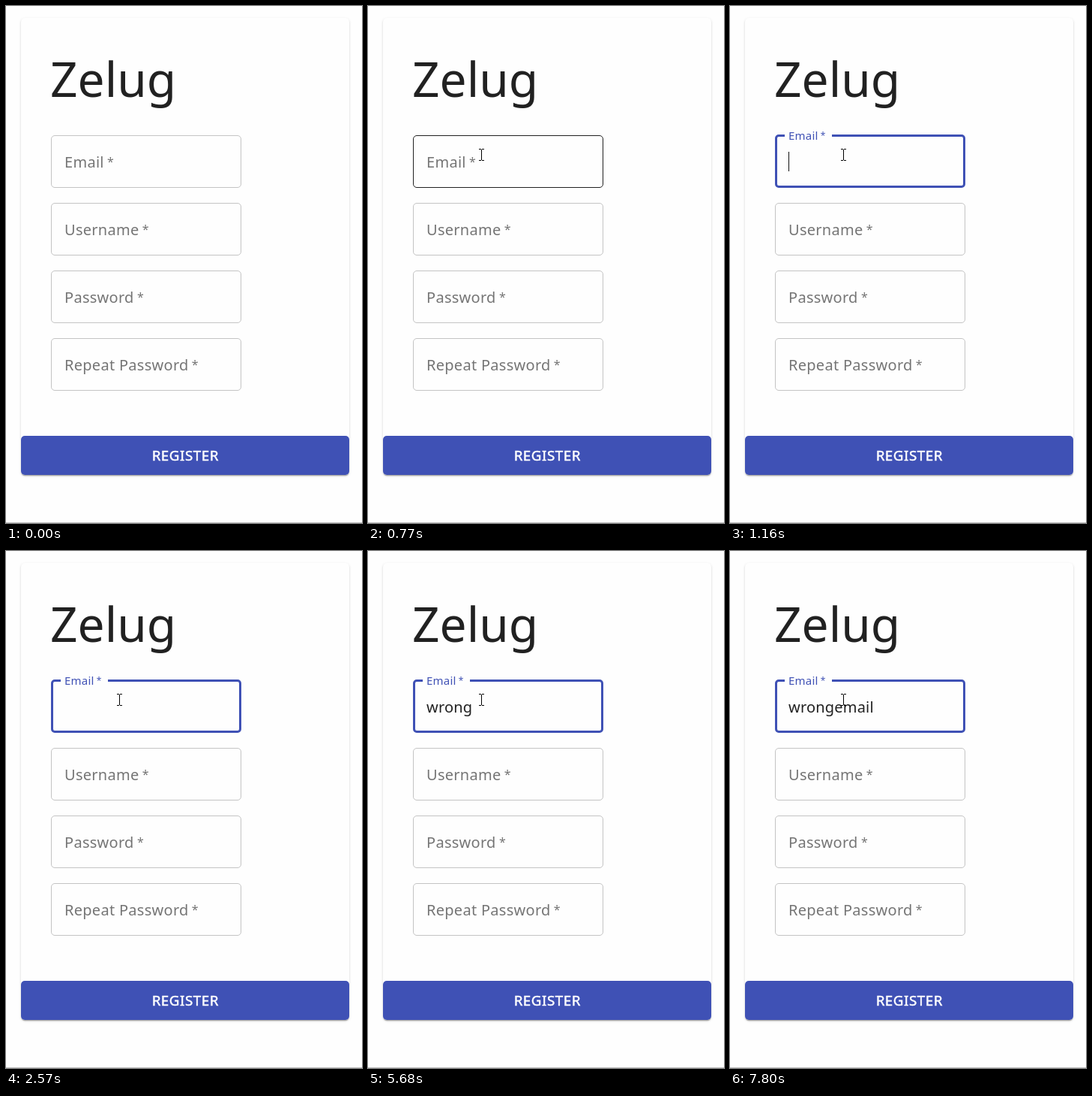
Write an HTML page that moves like this. It is 475 px wide and 688 px high and loops after 8000 ms.

```html
<!DOCTYPE html>
<html lang="en">
<head>
<meta charset="utf-8">
<title>Register form</title>
<style>
  html, body { margin: 0; width: 100%; height: 100%; overflow: hidden; background: #fefefe; }
  body { position: relative; }
  .card, .button { position: absolute; left: 20px; width: 438px; border-radius: 5px; }
  .card {
    top: 16px; height: 608px; background: #fefefe;
    box-shadow: 0 2.5px 1.25px -1.25px rgba(0,0,0,.2), 0 1.25px 1.25px rgba(0,0,0,.14), 0 1.25px 3.75px rgba(0,0,0,.12);
  }
  .button { top: 572px; height: 52px; background: #3f51b5; }
  svg { position: absolute; left: 0; top: 0; display: block; }
  text { font: 20px "Noto Sans", "Open Sans", sans-serif; letter-spacing: .19px; fill: #212121; white-space: pre; }
  .title { font-size: 64px; letter-spacing: 0; }
  .action {
    font-size: 18.75px; letter-spacing: .54px; text-anchor: middle;
    fill: #fff; stroke: #fff; stroke-width: .5px;
  }
  .label { fill: #757575; letter-spacing: .28px; }
  .star { font-size: 16px; }
  .box { fill: none; stroke: #c4c4c4; }
  .hover .box { stroke: #212121; }
  .focus .box { stroke: #3f51b5; stroke-width: 3; }
  .focus .label { fill: #3f51b5; }
</style>
</head>
<body>
<div class="card"></div>
<div class="button"></div>
<svg width="475" height="688" viewBox="0 0 475 688">
  <text class="title" x="59" y="121">Zelug</text>
  <g id="fields"></g>
  <text id="typed" x="78" y="215"></text>
  <rect id="caret" y="194" width="1" height="26" fill="#111"/>
  <text class="action" x="239.3" y="604.7">REGISTER</text>
  <rect y="687" width="475" height="1" fill="#c3c3c3"/>
  <path id="arrow" d="M.5.5V17l3.8-3.6 2.8 6.6 2.6-1.1-2.8-6.4h5.2Z" fill="#fff" stroke="#000"/>
  <path id="beam" d="M-3.5-8h3M.5-8h3M0-7.5V6.5M-3.5 7h3M.5 7h3" fill="none" stroke="#000"/>
</svg>
<script>
const LOOP = 8000;
const FOCUS_AT = 920;
const $ = id => document.getElementById(id);

const fields = ["Email", "Username", "Password", "Repeat Password"].map((name, i) => {
  const top = 172 + i * 90;
  $("fields").insertAdjacentHTML("beforeend", `<g>
    <rect class="box" x="60.5" y="${top + .5}" width="253" height="69" rx="4.5"/>
    <rect class="notch" x="73" y="${top - 2}" height="6" width="0" fill="#fefefe"/>
    <text class="label" transform="translate(78 ${top + 43})">${name}<tspan class="star" dx="4.2" dy="-2">*</tspan></text></g>`);
  const group = $("fields").lastElementChild;
  return { top, group, find: cls => group.querySelector("." + cls) };
});
const email = fields[0];

// [time, x, y]
const pointerSteps = [
  [290, 325, 589], [370, 300, 520], [450, 262, 432], [530, 225, 342],
  [610, 190, 268], [690, 160, 214], [770, 151, 198]
];

// [time, progress of the floating label]
const labelSteps = [[0, 0], [920, .12], [1000, .62], [1080, .94], [1160, 1]];

// [time, text, caret shown]
const typingSteps = [
  [0, "", 0], [920, "", 1], [1470, "", 0], [2020, "", 1], [2570, "", 0],
  [3110, "", 1], [3580, "", 0], [4130, "", 1],
  [4590, "w", 1], [4750, "wr", 1], [4900, "wro", 1], [4980, "wron", 1],
  [5210, "wrong", 1], [5680, "wrong", 0], [6070, "wrongr", 1], [6460, "wrong", 1],
  [6620, "wronge", 1], [6850, "wrongema", 1], [7090, "wrongemai", 1],
  [7330, "wrongemail", 1], [7800, "wrongemail", 0]
];

const stepAt = (steps, t) => steps.findLast(step => step[0] <= t);
const show = (node, on) => node.setAttribute("visibility", on ? "visible" : "hidden");
const setAll = (node, attrs) => {
  for (const key in attrs) node.setAttribute(key, attrs[key]);
};

function drawPointer(t) {
  const step = stepAt(pointerSteps, t);
  const [, x, y] = step || [0, -99, -99];
  const inside = f => x >= 60 && x < 314 && y >= f.top && y < f.top + 70;
  const overField = fields.some(inside);
  show($("arrow"), step && !overField);
  show($("beam"), overField);
  $("arrow").setAttribute("transform", `translate(${x} ${y})`);
  $("beam").setAttribute("transform", `translate(${x + .5} ${y + .5})`);
  fields.forEach(f => f.group.setAttribute("class", inside(f) ? "hover" : ""));
}

function drawEmail(t) {
  const focused = t >= FOCUS_AT;
  const p = stepAt(labelSteps, t)[1];
  if (focused) email.group.setAttribute("class", "focus");
  setAll(email.find("box"), focused
    ? { x: 61.5, y: 172.5, width: 251, height: 68, rx: 3.5 }
    : { x: 60.5, y: 172.5, width: 253, height: 69, rx: 4.5 });
  email.find("notch").setAttribute("width", 63 * Math.min(1, p * 1.6));
  email.find("label").setAttribute("transform",
    `translate(78 ${215 - 37 * p}) scale(${1 - .25 * p})`);
}

function drawTyping(t) {
  const [, text, caretOn] = stepAt(typingSteps, t);
  const typed = $("typed");
  if (typed.textContent !== text) typed.textContent = text;
  const width = text ? typed.getComputedTextLength() : 0;
  $("caret").setAttribute("x", Math.floor(78 + width));
  show($("caret"), caretOn);
}

const start = performance.now();
function frame(now) {
  const t = Math.max(0, now - start) % LOOP;
  drawPointer(t);
  drawEmail(t);
  drawTyping(t);
  requestAnimationFrame(frame);
}
frame(start);
</script>
</body>
</html>
```
